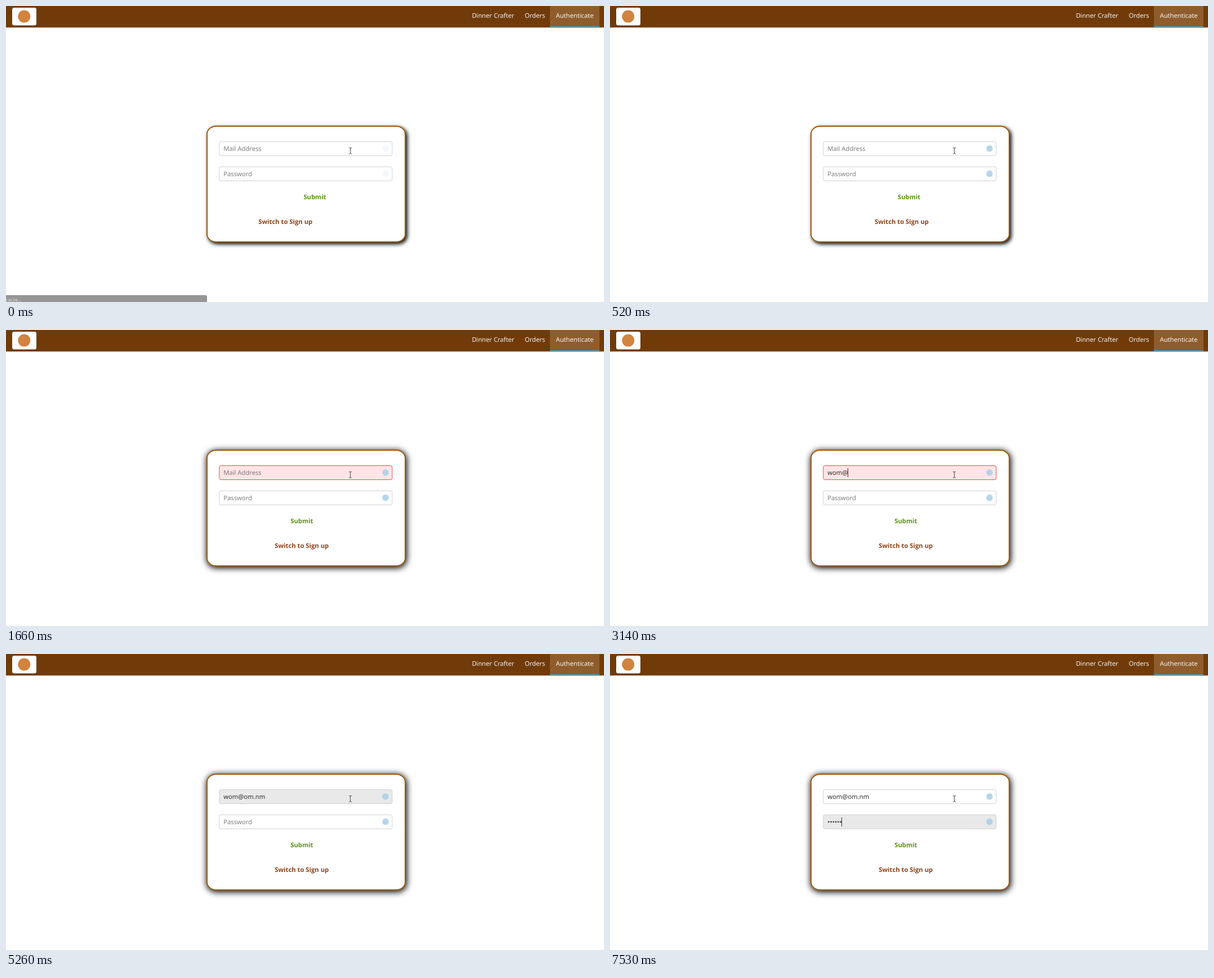
An HTML page for the animation above (8 s loop, 1062x527 px).

```html
<!DOCTYPE html>
<html lang="en">
<head>
<meta charset="utf-8">
<title>Sign in form</title>
<style>
  html, body { margin: 0; width: 100%; height: 100%; overflow: hidden; background: #fff; }
  #card {
    position: absolute; left: 356px; top: 213px; width: 353.5px; height: 208px;
    box-sizing: border-box; border: 2px solid #9a5c12; border-radius: 17px / 15px; background: #fff;
  }
  svg { position: absolute; left: 0; top: 0; display: block; }
  text { font: 11.27px "Open Sans", sans-serif; text-rendering: geometricPrecision; white-space: pre; }
  .bold { font-weight: 700; text-anchor: middle; }
</style>
</head>
<body>
<div id="card"></div>
<svg width="1062" height="527" viewBox="0 0 1062 527">
  <rect width="1062" height="38.3" fill="#703b09"/>
  <rect x="966" width="88" height="38.3" fill="#8f5c2c"/>
  <rect x="966" y="36.2" width="88" height="2.1" fill="#40a4c8"/>
  <rect x="11" y="3" width="43" height="31.5" rx="3.5" fill="#fff"/>
  <circle cx="32.3" cy="18.6" r="11" fill="#d0843f"/>
  <g class="bold" fill="#fff">
    <text x="865" y="21">Dinner Crafter</text>
    <text x="939.3" y="21">Orders</text>
    <text x="1010" y="21">Authenticate</text>
  </g>
  <g id="fields"></g>
  <text id="submit" class="bold" y="344" fill="#5c9210">Submit</text>
  <text id="switch" class="bold" y="387.5" fill="#8c4218">Switch to Sign up</text>
  <path d="M609 252.5h2l.5 .5 .5-.5h2M611.5 253v9.5M609 263h2l.5-.5 .5 .5h2" fill="none" stroke="#444" stroke-width="1"/>
  <g id="status">
    <path d="M0 514.7H354a3 3 0 0 1 3 3V527H0Z" fill="#959595"/>
    <text x="-1" y="525.5" fill="#e4e4e4" style="font-size:8.5px">Łączę…</text>
  </g>
</svg>
<script>
const LOOP = 8000, FOCUS = 1130, TAB = 5460, TEXT_X = 386.3;
const $ = id => document.getElementById(id);
const clamp = v => Math.min(1, Math.max(0, v));
const smooth = v => v * v * (3 - 2 * v);
const mix = (a, b, k) => a + (b - a) * k;

function el(parent, tag, attrs) {
  const node = document.createElementNS("http://www.w3.org/2000/svg", tag);
  set(node, attrs);
  return parent.appendChild(node);
}

function set(node, attrs) {
  for (const key in attrs) node.setAttribute(key, attrs[key]);
}

// keys: when each character is typed; off: spans in which the caret is hidden
const mail = makeField(241.5, {
  hint: "Mail Address", value: "wom@om.nm",
  keys: [2040, 2200, 2500, 3140, 3680, 3840, 4220, 4600, 4720],
  off: [[1660, 2040], [2990, 3140], [5260, 5460]],
  from: FOCUS, to: TAB, valid: 4600
});
const pass = makeField(286.3, {
  hint: "Password", value: "••••••",
  keys: [6250, 6410, 6610, 6810, 7100, 7530],
  off: [[5960, 6250]],
  from: TAB, to: LOOP, valid: 7530
});

function makeField(y, spec) {
  const g = $("fields");
  return {
    ...spec,
    box: el(g, "rect", { x: 378.8, y, width: 307, height: 25, rx: 3, "stroke-width": 1 }),
    icon: el(g, "circle", { cx: 674, cy: y + 12.3, r: 5.8, fill: "#a9cfe6" }),
    text: el(g, "text", { x: TEXT_X, y: y + 16.7 }),
    caret: el(g, "rect", { y: Math.round(y + 4.6), width: 1, height: 16, fill: "#222" })
  };
}

function drawField(f, t) {
  const focused = t >= f.from && t < f.to;
  const bad = focused && t < f.valid;
  const typed = f.value.slice(0, f.keys.filter(k => t >= k).length);
  set(f.box, {
    fill: bad ? "#fbe6e7" : focused ? "#e9e9e9" : "#fff",
    stroke: bad ? "#ee4c4c" : "#cfcfcf"
  });
  f.text.textContent = typed || f.hint;
  f.text.setAttribute("fill", typed ? "#222" : "#757575");
  const width = typed ? f.text.getComputedTextLength() : 0;
  const hidden = !focused || f.off.some(([a, b]) => t >= a && t < b);
  set(f.caret, { x: Math.floor(TEXT_X + width), visibility: hidden ? "hidden" : "visible" });
  f.icon.setAttribute("opacity", mix(0.15, 0.85, clamp(t / 400)));
}

function draw(t) {
  const slide = Math.pow(1 - clamp(t / 1100), 2.17);
  $("submit").setAttribute("x", 525.3 + 23.2 * slide);
  $("switch").setAttribute("x", 525.2 - 29 * slide);
  $("status").setAttribute("opacity", 1 - clamp((t - 20) / 160));

  const k = smooth(clamp((t - FOCUS) / 400));
  $("card").style.boxShadow =
    `${mix(2.8, 1, k)}px ${mix(3, 2, k)}px ${mix(7, 12, k)}px ${mix(0, 0.7, k)}px #000`;

  drawField(mail, t);
  drawField(pass, t);
}

const start = performance.now();
function tick() {
  draw((performance.now() - start) % LOOP);
  requestAnimationFrame(tick);
}
tick();
</script>
</body>
</html>
```
